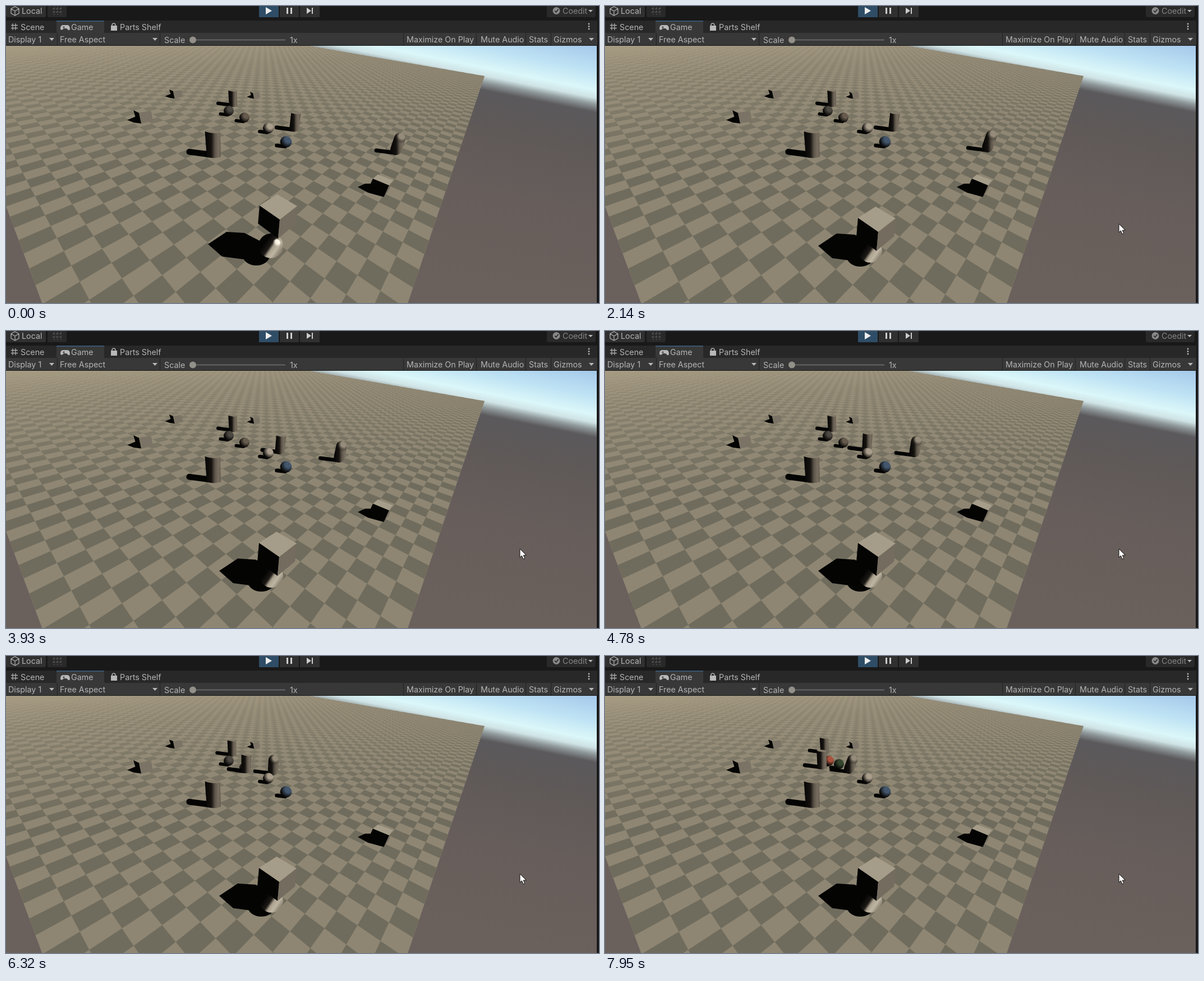
These frames come from a looping animation (1057x530 px, 8 s). An HTML page with a canvas:

```html
<!DOCTYPE html>
<html lang="en">
<head>
<meta charset="utf-8">
<style>
html, body { margin: 0; width: 100%; height: 100%; overflow: hidden; background: #191919; }
canvas, svg { position: absolute; left: 0; top: 0; }
text { font: 14.3px Inter, Roboto, sans-serif; fill: #b4b4b4; }
</style>
</head>
<body>
<canvas id="view" width="1057" height="530"></canvas>
<svg width="1057" height="71">
  <rect width="1057" height="71" fill="#191919"/>
  <g fill="#303030">
    <rect y="-4" width="71" height="24" rx="3"/><rect x="74" y="-4" width="34" height="24" rx="3" fill="#292929"/>
    <rect x="451" y="-4" width="35" height="24" fill="#2f4d66"/><rect x="488" y="-4" width="34" height="24"/>
    <rect x="524" y="-4" width="35" height="24"/><rect x="964" y="-4" width="87" height="24" rx="3" fill="#292929"/>
  </g>
  <rect y="26" width="1054" height="23" fill="#282828"/>
  <rect x="90" y="26" width="85" height="23" fill="#383838"/>
  <rect x="90" y="26" width="85" height="2" fill="#3a5470"/>
  <rect y="48" width="1054" height="22" fill="#383838"/>
  <path d="M91.5 48V70M274.5 48V70M708.5 48V70M838.5 48V70M926.5 48V70M971.5 48V70" stroke="#222"/>
  <g fill="none" stroke="#aaa" stroke-width="1.3">
    <path d="M16 1l7 4v8l-7 4-7-4V5zM9 5l7 4 7-4M16 9v8"/>
    <path d="M86 2v14M92 2v14M98 2v14M83 5h16M83 11h16" stroke="#555" stroke-dasharray="4 2"/>
    <path d="M12 31v12M17 31v12M9 34.5h12M9 39.5h12"/>
    <path d="M189 35v-1a3 3 0 0 1 6 0v1" stroke-width="1.6"/>
    <path d="M338 60.500H498" stroke="#656565" stroke-width="2"/>
  </g>
  <g fill="#b8b8b8">
    <path d="M463 2l11 6.5-11 6.5z" fill="#eee"/>
    <path d="M500 3h3v11h-3zM507 3h3v11h-3zM536 3l8 5.5-8 5.5zM545 3h2v11h-2z" fill="#ccc"/>
    <path d="M101 34h9q4 1 4 7-1 4-4 1l-2-2h-5l-2 2q-4 2-4-2 0-5 4-6zM187 35h11v9h-11z"/>
    <path d="M77 57h9l-4.5 5zM261 57h9l-4.5 5zM1039 57h9l-4.5 5zM1038 7h8l-4 4z"/>
    <circle cx="333" cy="60.5" r="6" fill="#929088"/><circle cx="981" cy="8.5" r="6.5" fill="#888"/>
    <circle cx="1039" cy="32" r="1.4"/><circle cx="1039" cy="36.5" r="1.4"/><circle cx="1039" cy="41" r="1.4"/>
  </g>
  <path d="M978 8.5l2.5 2.5 4-5" fill="none" stroke="#292929" stroke-width="1.7"/>
  <path d="M101 38h4M103 36v4" stroke="#383838"/>
  <text x="28" y="14">Local</text><text x="992" y="14" style="fill:#858585">Coedit</text>
  <text x="26" y="42.5">Scene</text><text x="116" y="42.5">Game</text><text x="203" y="42.5">Parts Shelf</text>
  <text x="4" y="64.5">Display 1</text><text x="96" y="64.5">Free Aspect</text>
  <text x="282" y="66">Scale</text><text x="506" y="66">1x</text>
  <text x="714" y="64.5">Maximize On Play</text><text x="846" y="64.5">Mute Audio</text>
  <text x="932" y="64.5">Stats</text><text x="976" y="64.5">Gizmos</text>
</svg>
<script>
const W = 1057, H = 530, TOP = 71, LOOP = 8000, BLACK = '#040403';
const ctx = document.getElementById('view').getContext('2d');
const backdrop = document.createElement('canvas');
backdrop.width = W;
backdrop.height = H;

const progress = (t, from, to) => Math.min(1, Math.max(0, (t - from) / (to - from)));
const lerp = (a, b, k) => a + (b - a) * k;
const add = (p, q, k = 1) => [p[0] + q[0] * k, p[1] + q[1] * k];

function polygon(pts, fill) {
  ctx.beginPath();
  pts.forEach(p => ctx.lineTo(...p));
  ctx.closePath();
  ctx.fillStyle = fill;
  ctx.fill();
}

function ramp(c, x0, y0, x1, y1, stops) {
  const g = c.createLinearGradient(x0, y0, x1, y1);
  stops.forEach(([at, color]) => g.addColorStop(at, color));
  return g;
}

// Perspective floor, counted in cells from its far right corner.
const CELLS = 72, STEP_U = 0.943 / CELLS, STEP_V = STEP_U * 0.688;
function floorPoint(u, v) {
  const a = u * STEP_U, b = v * STEP_V, w = 1 - a + b;
  return [(853 - 880 * a - 151 * b) / w, (125 - 45 * a - 48 * b) / w];
}
function floorQuad(c, u, v, n) {
  c.moveTo(...floorPoint(u, v));
  c.lineTo(...floorPoint(u + n, v));
  c.lineTo(...floorPoint(u + n, v + n));
  c.lineTo(...floorPoint(u, v + n));
  c.closePath();
}

function paintBackdrop() {
  const c = backdrop.getContext('2d');
  c.fillStyle = ramp(c, 1053, 71, 963, 521, [
    [0, '#a5c8ea'], [0.1, '#bfe3f4'], [0.17, '#dbf7f9'], [0.2, '#cfe3e5'],
    [0.225, '#8f989a'], [0.255, '#5b595c'], [0.4, '#5f5958'], [0.65, '#675e5b'], [1, '#6a605c']]);
  c.fillRect(0, TOP, W, H);
  c.save();
  c.beginPath();
  floorQuad(c, 0, 0, CELLS);
  c.clip();
  c.fillStyle = '#8e8673';
  c.fillRect(0, TOP, W, H);
  c.beginPath();
  for (let u = 0; u < CELLS; u++)
    for (let v = u % 2; v < CELLS; v += 2) floorQuad(c, u, v, 1);
  c.fillStyle = '#706c5d';
  c.fill();
  c.fillStyle = ramp(c, 0, TOP, 15, 310, [
    [0, 'rgba(174,162,136,.85)'], [0.25, 'rgba(164,153,129,.5)'], [1, 'rgba(145,137,117,0)']]);
  c.fillRect(0, TOP, W, H);
  c.restore();
  c.fillStyle = '#191919';
  c.fillRect(1053, TOP, 4, H);
}

function bar(x0, y0, x1, y1, width, style) {
  ctx.beginPath();
  ctx.moveTo(x0, y0);
  ctx.lineTo(x1, y1);
  ctx.lineCap = 'round';
  ctx.lineWidth = width;
  ctx.strokeStyle = style;
  ctx.stroke();
}

const shadow = (x, y, length, width) => bar(x, y, x - length, y - length * 0.13, width, BLACK);

const sideLight = (x, r) => ramp(ctx, x - r, 0, x + r, 0,
  [[0, '#080706'], [0.38, '#15120f'], [0.62, '#5d554a'], [0.85, '#776d5f'], [1, '#675e52']]);

function cylinder(x, y, r, h, lean) {
  shadow(x, y - r * 0.4, h * 0.93, r * 0.85);
  const top = y - h, flat = r * 0.22, wide = r * 1.06;
  ctx.beginPath();
  ctx.moveTo(x + lean - wide, top);
  ctx.lineTo(x - r, y - flat);
  ctx.ellipse(x, y - flat, r, flat, 0, Math.PI, 0, true);
  ctx.lineTo(x + lean + wide, top);
  ctx.closePath();
  ctx.fillStyle = sideLight(x + lean / 2, r * 1.05);
  ctx.fill();
  ctx.beginPath();
  ctx.ellipse(x + lean, top, wide, flat, 0.1, 0, 7);
  ctx.fillStyle = '#857c6b';
  ctx.fill();
}

function shade(x, y, r, color, edge) {
  const lx = x + r * 0.4, ly = y - r * 0.4;
  const g = ctx.createRadialGradient(lx, ly, 0, lx, ly, r * 1.5);
  g.addColorStop(0.35, color);
  g.addColorStop(0.9, edge);
  ctx.beginPath();
  ctx.arc(x, y, r, 0, 7);
  ctx.fillStyle = g;
  ctx.fill();
}

function ball(x, y, r, color) {
  shadow(x - 2, y + r * 0.8, r * 1.4, r * 0.65);
  shade(x, y, r, color, '#090807');
}

function capsule(x, y, lean, h, r) {
  shadow(x - 2, y + r * 0.6, r * 3.3, r * 0.7);
  bar(x, y, x + lean, y - h, r * 2, sideLight(x + lean / 2, r * 1.15));
  shade(x + lean, y - h, r, '#958b7a', 'rgba(12,10,8,0)');
}

// Small upright box seen from its front, with its shadow.
function block(x, y, s) {
  const at = (...pts) => pts.map(p => add([x, y], p, s));
  polygon(at([-0.32, 0.5], [0.1, 0.33], [0, 0], [0.3, 0.14], [0.42, 0.68], [0.04, 0.63]), BLACK);
  polygon(at([0.28, 0.12], [0.9, 0.03], [1, 0.55], [0.4, 0.68]), '#7b7466');
}

// Box seen from above; edges run from its nearest top corner.
function cube(near, right, left, down) {
  const r = add(near, right), l = add(near, left), foot = add(near, down);
  polygon([near, l, add(l, down, 0.95), foot], BLACK);
  polygon([near, r, add(r, down, 0.95), foot], '#746c5f');
  polygon([near, r, add(near, add(right, left), 0.92), l], '#a59d89');
}

function stack(t) {
  const fall = progress(t, 0, 490);
  const moved = (dx, dy, pts) => pts.map(p => add(p, [dx, dy], fall));
  polygon(moved(20, 3, [[360, 425], [393, 403], [425, 405], [458, 422], [446, 455], [385, 447]]), BLACK);
  ctx.beginPath();
  ctx.ellipse(lerp(446, 455, fall), lerp(445, 447, fall), 24, 18, 0, 0, 7);
  ctx.fill();
  const x = lerp(472, 473, fall), y = lerp(428, 437, fall);
  ctx.beginPath();
  ctx.arc(x, y, 22 - fall, 0, 7);
  ctx.fillStyle = ramp(ctx, x - 8, y - 10, x + 18, y + 8,
    [[0, BLACK], [0.35, '#1c1915'], [0.52, '#aaa08e'], [0.75, '#beb5a3'], [1, '#8d8474']]);
  ctx.fill();
  if (fall < 1) shade(482, 423, 7, `rgba(255,248,232,${1 - fall})`, 'rgba(255,248,232,0)');
  cube(add([488, 381], [-1, 22], fall), [31, -24], [-36, -25], [-3, 34]);
}

function cursor(t) {
  if (t < 1310) return;
  const k = progress(t, 1310, 2060);
  const tip = [lerp(988, 916, k), lerp(506, 389, k)];
  polygon([[0, 0], [0, 15], [3.4, 12], [6, 18], [8.7, 17], [6.2, 11.2], [11, 11]].map(p => add(p, tip)), '#fff');
  ctx.strokeStyle = '#111';
  ctx.lineWidth = 1;
  ctx.stroke();
}

function draw(t) {
  ctx.drawImage(backdrop, 0, 0);
  block(291, 149, 24);
  block(227, 186, 35);
  block(435, 153, 18);
  polygon([[627, 323], [640, 317], [655, 317], [674, 341], [645, 333]], BLACK);
  cube([683, 320], [7, -9], [-29, -12], [-9, 20]);

  // Constant glides, then short pushes where bodies touch.
  const glide = progress(t, 1880, 6970), bump = progress(t, 6970, 7950);
  const slide = progress(t, 2915, 7950);
  const push = 1 - (1 - progress(t, 6200, 7600)) ** 1.5;
  const pillY = 256 - 55 * glide - 36 * glide * (1 - glide);
  const slideY = 224 - 22 * slide;
  const midY = 199 - 6 * bump;
  const midColor = bump > 0.15 ? '#34452d' : slide > 0.49 && slide < 0.66 ? '#2a221b' : '#655a4c';
  [
    [180 - 5 * push, y => cylinder(405 - 13.5 * push, y, 7.3, 29, -1)],
    [196, () => ball(397 + 2 * bump, 187, 9, bump > 0.35 ? '#a9523d' : '#4b4741')],
    [midY + 9, () => ball(425 - 8 * bump, midY, 9, midColor)],
    [slideY, y => cylinder(513 - 126 * slide, y, 8.3, 33, 4 - 5 * slide)],
    [pillY + 9, () => capsule(695 - 251 * glide - 9 * bump, pillY,
      7 * (1 - glide) + 6 * bump, 20 - 2 * glide - 2 * bump, 10 - glide)],
    [227, () => ball(467.5, 218, 9.5, '#a89d8b')],
    [253, () => ball(499, 242.5, 10.3, '#43566c')],
    [271, y => cylinder(370.5, y, 12.7, 47, -2.5)]
  ].sort((a, b) => a[0] - b[0]).forEach(([y, paint]) => paint(y));
  stack(t);
  cursor(t);
}

paintBackdrop();
const start = performance.now();
(function tick() {
  draw((performance.now() - start) % LOOP);
  requestAnimationFrame(tick);
})();
</script>
</body>
</html>
```
